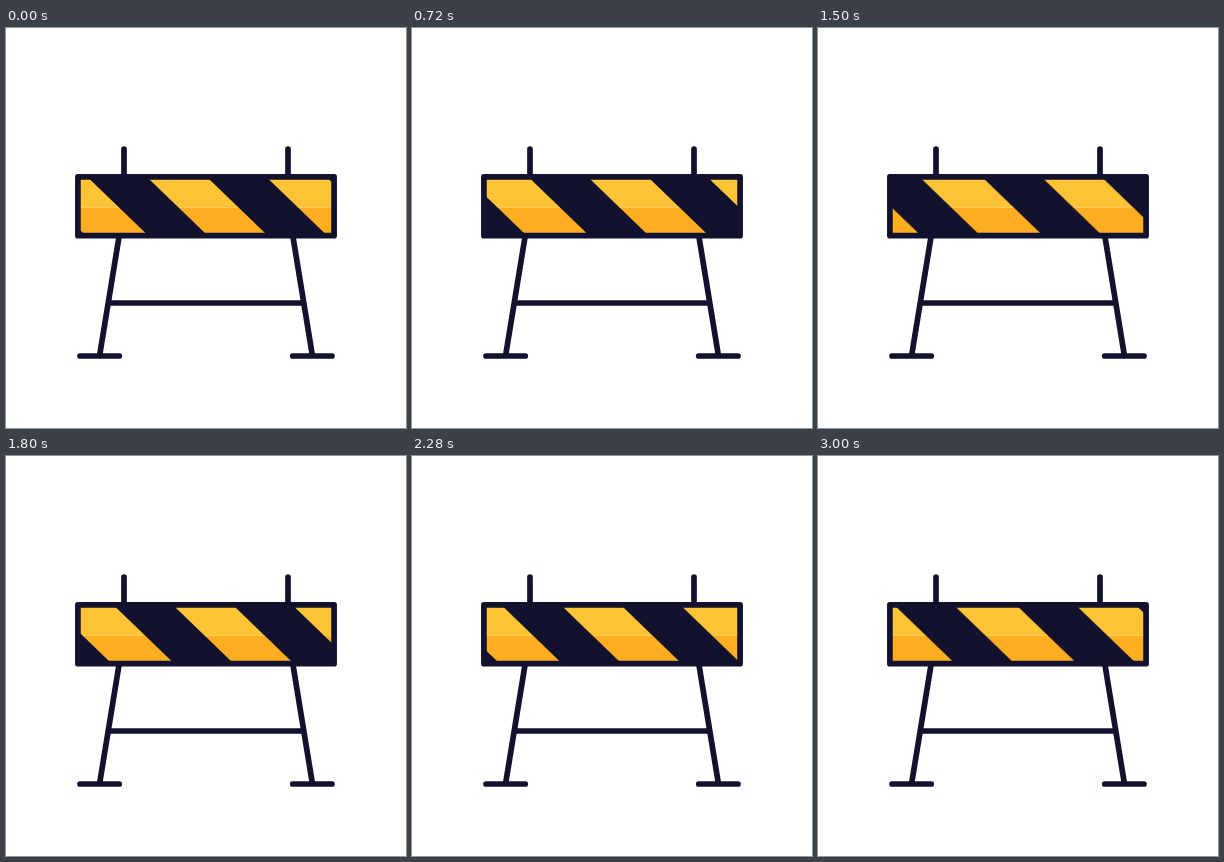
These frames come from a looping animation (400 px wide and 400 px high, 5090 ms). An HTML page without scripts:

```html
<!DOCTYPE html>
<html lang="en">
<head>
<meta charset="utf-8">
<title>Road barrier</title>
<style>
  html, body { margin: 0; width: 100%; height: 100%; overflow: hidden; background: #fff; }
  svg { display: block; width: 100vw; height: 100vh; }
  .line { fill: none; stroke: #12122e; stroke-width: 5.7; stroke-linecap: round; stroke-linejoin: round; }
  .bars { fill: #12122e; animation: slide 5090ms infinite; }

  /* Four quick passes and one slower pass in 30 ms steps, then a pause. */
  @keyframes slide {
    0%       { transform: translateX(0);       animation-timing-function: steps(19); }
    11.197%  { transform: translateX(122.9px); animation-timing-function: step-end; }
    11.198%  { transform: translateX(2.6px);   animation-timing-function: steps(19); }
    22.396%  { transform: translateX(125.5px); animation-timing-function: step-end; }
    22.397%  { transform: translateX(5px);     animation-timing-function: steps(18); }
    33.005%  { transform: translateX(121.5px); animation-timing-function: step-end; }
    33.006%  { transform: translateX(.1px);    animation-timing-function: steps(19); }
    44.203%  { transform: translateX(123px);   animation-timing-function: step-end; }
    44.204%  { transform: translateX(3.4px);   animation-timing-function: steps(25); }
    58.939%, 100% { transform: translateX(116.8px); }
  }
</style>
</head>
<body>
<svg viewBox="0 0 400 400">
  <defs>
    <clipPath id="board"><rect x="72" y="149" width="256" height="58.6"/></clipPath>
    <path id="bar" d="M-3.1 149h59.5l61.2 59h-59.5z"/>
    <g id="side">
      <path d="M118 121v28"/>
      <path d="M113 209L93.7 327"/>
      <path d="M74 328h39.3"/>
    </g>
  </defs>

  <g class="line">
    <use href="#side"/>
    <use href="#side" transform="matrix(-1 0 0 1 400 0)"/>
    <path d="M103 275h194"/>
  </g>

  <g clip-path="url(#board)">
    <rect x="72" y="149" width="256" height="30.5" fill="#ffc436"/>
    <rect x="72" y="179.5" width="256" height="29" fill="#ffae21"/>
    <g class="bars">
      <use href="#bar" x="-37.5"/>
      <use href="#bar" x="84.5"/>
      <use href="#bar" x="204"/>
      <use href="#bar" x="323.5"/>
    </g>
  </g>
  <rect class="line" x="71.9" y="148.9" width="256.2" height="58.8"/>
</svg>
</body>
</html>
```
